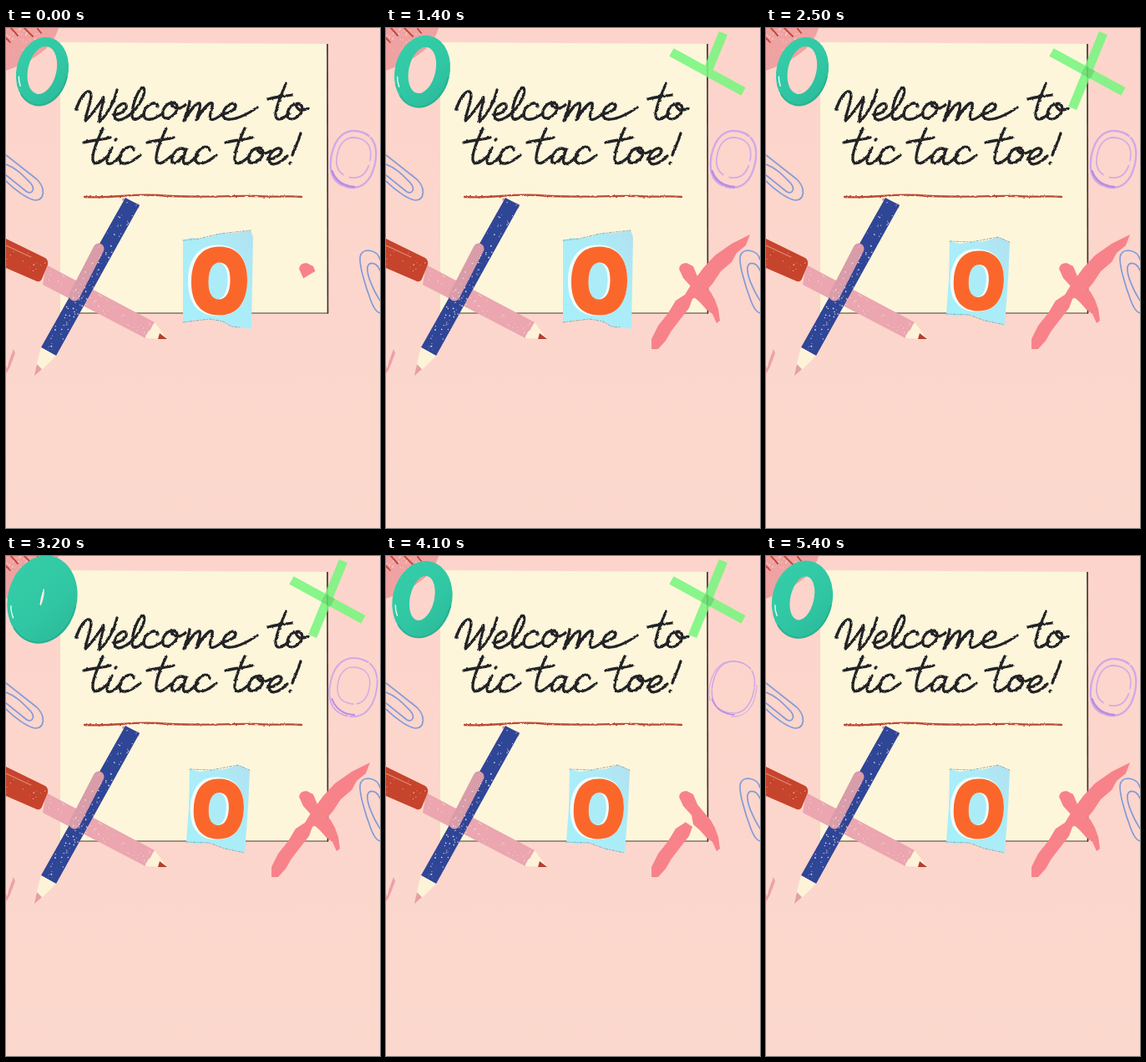
Animation, 448 px wide and 598 px high, one loop 5.5 s. Source, as an HTML page:

```html
<!DOCTYPE html>
<html lang="en">
<head>
<meta charset="utf-8">
<title>Welcome to tic tac toe!</title>
<style>
html, body { margin: 0; width: 100%; height: 100%; overflow: hidden; background: #fcd7cc; }
svg { display: block; width: 100%; height: 100%; }
.line { fill: none; stroke-linecap: round; stroke-linejoin: round; }
</style>
</head>
<body>
<svg viewBox="0 0 448 598" preserveAspectRatio="none">
  <defs>
    <linearGradient id="wall" x2="0" y2="1">
      <stop offset="0" stop-color="#fdd4cb"/><stop offset=".55" stop-color="#fcd6cc"/><stop offset="1" stop-color="#fbd8cd"/>
    </linearGradient>
    <linearGradient id="scrap" x1="1" x2="0" y2="1">
      <stop offset="0" stop-color="#b2e0f0"/><stop offset=".3" stop-color="#adebf7"/><stop offset="1" stop-color="#a6f0fb"/>
    </linearGradient>
    <linearGradient id="balloon" x2="1" y2="1">
      <stop offset="0" stop-color="#36cfaa"/><stop offset=".6" stop-color="#30c6a3"/><stop offset="1" stop-color="#2ab797"/>
    </linearGradient>
    <filter id="rough" filterUnits="userSpaceOnUse" x="70" y="50" width="310" height="170">
      <feTurbulence type="fractalNoise" baseFrequency=".28" numOctaves="2" seed="4"/>
      <feDisplacementMap in="SourceGraphic" scale="2.6" xChannelSelector="R" yChannelSelector="G"/>
    </filter>
    <mask id="maskA" maskUnits="userSpaceOnUse" x="300" y="230" width="148" height="170">
      <path id="wipeA" d="M354 277L402 356" pathLength="1" fill="none" stroke="#fff" stroke-width="46"/>
    </mask>
    <mask id="maskB" maskUnits="userSpaceOnUse" x="300" y="230" width="148" height="170">
      <path id="wipeB" d="M314 392L362 318L440 244" pathLength="1" fill="none" stroke="#fff" stroke-width="56"/>
    </mask>
  </defs>

  <rect width="448" height="598" fill="url(#wall)"/>

  <!-- corner tassel -->
  <path d="M0 0H63C58 16 50 24 40 31C28 40 14 46 0 51Z" fill="#efa2a2"/>
  <path class="line" d="M0 12L5 17M6 0L14 9M22 0L32 10M38 1L42 6" stroke="#c3493c" stroke-width="2"/>
  <g id="cornerDots" fill="#fbd5cf"></g>

  <!-- note -->
  <path d="M65 17L384 19L385 341H65Z" fill="#fdf6db"/>
  <path d="M385 19L385.5 341.5" stroke="#35302d" stroke-width="1.6"/>
  <path d="M65 341H386" stroke="#453e38" stroke-width="1.2"/>

  <g filter="url(#rough)">
    <g class="line" role="img" aria-label="Welcome to tic tac toe!" stroke="#242326" stroke-width="3.3">
      <path d="M84 98C88 84 97 72 101 77C105 82 96 100 95 111C104 103 112 90 117 83C117 92 111 102 112 112C121 104 130 88 133 74"/>
      <path d="M128 104C136 104 146 98 144 92C141 87 130 95 130 104C130 113 140 111 149 103C161 93 168 76 165 72C160 68 151 92 151 104C151 113 159 109 165 103"/>
      <path d="M182 94C181 85 166 92 165 103C165 113 177 110 188 102"/>
      <path d="M201 90C193 88 186 98 188 105C192 113 205 103 205 95C205 89 200 88 198 91C202 98 209 97 215 92"/>
      <path d="M220 88C219 96 215 104 213 111C219 101 228 89 232 90C234 95 229 104 228 110C234 100 243 88 247 90C249 95 242 104 245 109C248 111 254 107 259 103C268 102 276 97 275 92C272 86 260 95 260 104C261 114 281 109 301 95"/>
      <path d="M335 67C330 80 322 96 323 105C324 112 332 109 339 102M314 85C324 82 333 82 343 80"/>
      <path d="M350 91C341 90 335 100 338 107C343 113 355 104 355 96C354 90 349 89 347 92C350 100 356 99 362 96"/>
      <path id="tee" d="M116 120C110 134 103 148 104 158C106 166 114 160 122 153M93 137C104 134 114 134 125 131"/>
      <path d="M127 143C123 151 119 159 122 162C127 164 132 158 138 152M131 134L132 133"/>
      <path id="cee" d="M153 146C151 137 137 145 136 156C136 166 148 163 161 152"/>
      <use href="#tee" x="76"/>
      <path d="M214 145C206 141 197 152 199 160C203 166 213 153 216 145C212 154 211 161 215 163C220 162 225 157 230 152"/>
      <use href="#cee" x="91"/>
      <use href="#tee" x="170"/>
      <path d="M304 144C296 142 289 152 291 159C295 166 308 156 308 149C307 143 303 142 301 145C304 152 311 151 317 147"/>
      <path d="M313 157C321 157 331 151 330 146C327 140 315 148 315 157C316 167 327 163 337 153"/>
      <path d="M353 126C350 136 346 144 343 152M341 161L340 162"/>
    </g>
    <path class="line" d="M94 202C130 204 146 198 182 200C230 204 262 200 300 201C326 203 338 200 354 202" stroke="#bd4a36" stroke-width="2.3"/>
  </g>

  <!-- paper clips -->
  <g class="line" stroke="#829bd8" stroke-width="1.7">
    <path d="M0 152L37 181C48 192 46 206 35 206C26 205 10 193 0 183M0 163C12 167 21 177 29 185C36 193 31 199 25 196L0 176"/>
    <path d="M448 277C445 265 429 263 425 271C421 279 431 310 437 326C440 334 444 340 448 341M448 290C444 280 435 279 433 286C432 295 439 312 448 326"/>
  </g>

  <!-- pencils -->
  <path d="M9 384L11 389L5 405L1 412L3 400ZM0 404L3 409L0 413Z" fill="#e9a3a8"/>
  <path d="M48 283L178 352L167 371L44 307Z" fill="#eba6b0"/>
  <path d="M178 352L193 372L167 371C167 366 170 366 170 363C174 362 174 358 175 357Z" fill="#fdf3d8"/>
  <path d="M184 365L193 372L182 372Z" fill="#b63e2e"/>
  <path d="M0 252L47 275Q51 278 50 283L43 300Q41 304 37 303L0 287Z" fill="#c6432c"/>
  <path class="line" d="M0 260L30 274" stroke="#e08a74" stroke-width="1.2"/>
  <path d="M140 203L160 211L159 216L139 206Z" fill="#d99aa0"/>
  <path d="M143 203L160 212L60 392L42 382Z" fill="#2f4596"/>
  <path class="line" d="M111 264L82 320" stroke="#d99ca9" stroke-width="13"/>
  <path d="M42 382L60 392L43 409L36 405Z" fill="#fdf3d8"/>
  <path d="M37 402L43 408L34 416Z" fill="#e3a0a6"/>
  <g id="specks"></g>

  <path id="paper" fill="url(#scrap)"/>
  <g id="letter"><path id="halo" fill="#f3fdfc" fill-rule="evenodd"/><path id="oh" fill="#fb672b" fill-rule="evenodd"/></g>
  <path id="tear" class="line" stroke="#8aa4ab" stroke-width=".9" stroke-dasharray="3 2 1 2"/>

  <g id="cross" fill="#f8828a">
    <path mask="url(#maskA)" d="M351 288Q352 281 360 281L368 285L373 297L382 308L389 316L394 325L398 336L400 350L396 353L391 342L384 337L376 328L368 321L366 310L356 299Z"/>
    <path mask="url(#maskB)" d="M318 384L318 372L326 356L338 341L347 326L358 319L366 306L380 287L394 272L414 258L436 247L431 260L420 269L414 280L401 291L391 306L380 318L367 324L363 335L352 349L342 362L335 374L326 384Z"/>
  </g>

  <g stroke="#79f67f" stroke-width="11" fill="none" opacity=".88">
    <path id="tapeA" d="M342 29L428 76" pathLength="1"/>
    <path id="tapeB" d="M404 6L367 96" pathLength="1"/>
    <path id="tapeMix" d="M380 50L391 56" stroke="#5fdc6b"/>
  </g>

  <g id="scribble" class="line" stroke="#c8a3ec"></g>

  <g id="ring">
    <path id="ringShape" fill="url(#balloon)" fill-rule="evenodd"/>
    <path id="shade" class="line" stroke="#22a688" stroke-width="2" opacity=".6"/>
    <path id="shine" class="line" stroke="#e8fff6" stroke-width="1.4"/>
  </g>
  <g id="burst">
    <path id="star" fill="#33cba7"/>
    <path id="core" fill="#fff"/>
    <g id="bits"></g>
  </g>
</svg>

<script>
const LOOP = 5500, STEP = 100;
const el = id => document.getElementById(id);
const set = (id, attrs) => { for (const k in attrs) el(id).setAttribute(k, attrs[k]); };
const show = (id, on) => set(id, { visibility: on ? 'visible' : 'hidden' });
const clamp = x => Math.max(0, Math.min(1, x));
const lerp = (a, b, u) => a + (b - a) * u;

function seeded(s) {
  return () => (s = (s * 16807) % 2147483647) / 2147483647;
}

function ellipse(cx, cy, rx, ry) {
  return `M${cx - rx} ${cy}A${rx} ${ry} 0 1 1 ${cx + rx} ${cy}A${rx} ${ry} 0 1 1 ${cx - rx} ${cy}Z`;
}

// squarer than an ellipse, like a bold printed O
function bowl(cx, cy, rx, ry) {
  const k = 0.64, x = rx * k, y = ry * k;
  return `M${cx - rx} ${cy}c0 ${-y} ${rx - x} ${-ry} ${rx} ${-ry}s${rx} ${ry - y} ${rx} ${ry}` +
    `s${x - rx} ${ry} ${-rx} ${ry}s${-rx} ${y - ry} ${-rx} ${-ry}Z`;
}

function spikes(cx, cy, n, rx, ry, dip, turn) {
  const at = (i, k) => {
    const a = turn + i * 2 * Math.PI / n;
    return `${(cx + rx * k * Math.cos(a)).toFixed(1)} ${(cy + ry * k * Math.sin(a)).toFixed(1)}`;
  };
  let d = 'M' + at(0, 1);
  for (let i = 0; i < n; i++) d += `Q${at(i + .5, dip)} ${at(i + 1, i % 2 ? 1 : .92)}`;
  return d + 'Z';
}

function scatter() {
  const rnd = seeded(77);
  let out = '';
  const along = (n, ax, ay, bx, by, half, fill) => {
    const len = Math.hypot(bx - ax, by - ay), nx = -(by - ay) / len, ny = (bx - ax) / len;
    for (let i = 0; i < n; i++) {
      const u = rnd(), v = (rnd() * 2 - 1) * half, r = .35 + rnd() * .55;
      out += `<circle cx="${(lerp(ax, bx, u) + nx * v).toFixed(1)}" cy="${(lerp(ay, by, u) + ny * v).toFixed(1)}" r="${r.toFixed(2)}" fill="${fill}"/>`;
    }
  };
  along(95, 151, 208, 52, 386, 8.5, '#dfe3f2');
  along(50, 48, 295, 170, 360, 9, '#f9d3d2');
  along(14, 0, 270, 44, 290, 13, '#f0a894');
  el('specks').innerHTML = out;
  out = '';
  along(40, 2, 2, 32, 22, 18, '#fbd5cf');
  el('cornerDots').innerHTML = out;
}

const sheets = [
  { d: 'M212 254L222 251L231 252L243 250L256 246L276 245L293 242L296 250L294 360L281 358L270 357L260 351L244 348L228 349L212 352Z',
    tear: 'M212 254L231 252L256 246L293 242M212 352L244 348L260 351L270 357L281 358',
    o: [255.5, 302.5, 33.5, 41, 13, 22], turn: 2 },
  { d: 'M220 255L232 258L246 256L262 255L278 250L292 256L290 300L286 355L273 352L262 350L254 346L243 343L228 345L216 342L219 300Z',
    tear: 'M220 255L246 256L278 250L292 256M216 342L243 343L262 350L286 355',
    o: [254.8, 302.5, 30, 36, 12, 19.5], turn: 4 }
];

function drawLetter(t) {
  const s = sheets[t % 700 < 350 ? 0 : 1], [x, y, rx, ry, hx, hy] = s.o;
  set('paper', { d: s.d });
  set('tear', { d: s.tear });
  set('letter', { transform: `rotate(${s.turn} ${x} ${y})` });
  set('halo', { d: bowl(x - 2, y - .5, rx + 2, ry + 1.5) + bowl(x - 3, y, hx, hy) });
  set('oh', { d: bowl(x, y, rx, ry) + bowl(x, y, hx, hy) });
}

function wipe(id, u) {
  set(id, { 'stroke-dasharray': `${u} 3` });
}

function drawCross(t) {
  const p = t % 3800;
  show('cross', p < 3600);
  wipe('wipeA', clamp(.22 + p * .0038));
  wipe('wipeB', clamp((p - 200) * .0044));
}

function drawTape(t) {
  const a = clamp((t - 820) / 370), b = clamp((t - 1220) / 340), on = t < 5100;
  show('tapeA', on && a > 0);
  show('tapeB', on && b > 0);
  show('tapeMix', on && b > .6);
  wipe('tapeA', a);
  wipe('tapeB', b);
}

// cx, outer radii, inner centre y, inner radii, dash of the inner line, weight
const loops = {
  A: [416, 26.5, 34, 155, 20, 24, '70 6 30 8', 2.4],
  B: [415.5, 27, 35, 154, 20, 24, '46 9 80 5', 2.4],
  C: [416, 28, 35, 155, 19, 22, '90 4', 2],
  D: [416.5, 26.5, 35, 157, 18, 23, '52 7', 1.9],
  E: [416, 25, 31, 159, 28, 33, '54 34', 1.6]
};

function drawScribble(k) {
  const [cx, rx, ry, iy, ix, iry, dash, w] = loops['AAEDCCCBBBDAAE'[k % 14]];
  el('scribble').innerHTML =
    `<g transform="rotate(12 ${cx} 157)">` +
    `<path d="${bowl(cx, 157, rx, ry)}" stroke-width="${w}" stroke-dasharray="62 3 20 2" opacity=".85"/>` +
    `<path d="${bowl(cx, iy, ix, iry)}" stroke-width="${w * .75}" stroke-dasharray="${dash}" opacity=".8"/>` +
    `<path d="M${cx - 22} 176Q${cx - 12} 192 ${cx + 8} 189" stroke-width="${w}" stroke="#b98ce4"/></g>`;
}

// phase, outer radii, hole radii
const puff = [
  [0, 31, 41.5, 17, 29], [350, 35.5, 46.5, 14.5, 27], [400, 36, 47, 14, 26.5],
  [650, 38.5, 50, 8, 18.5], [700, 41.5, 53, 1.5, 9], [950, 42, 53.5, 1.2, 8]
];

function drawRing(p) {
  let i = 0;
  while (i < puff.length - 2 && p >= puff[i + 1][0]) i++;
  const a = puff[i], b = puff[i + 1], u = clamp((p - a[0]) / (b[0] - a[0]));
  const [rx, ry, hx, hy] = [1, 2, 3, 4].map(j => lerp(a[j], b[j], u));
  const x = 43.5, y = 52;
  set('ring', { transform: `rotate(13 ${x} ${y})` });
  set('ringShape', { d: ellipse(x, y, rx, ry) + ellipse(x - .5, y - 1.5, hx, hy) });
  set('shade', { d: `M${x + rx - 1} ${y}A${rx - 1} ${ry - 1} 0 0 1 ${x - rx * .6} ${y + ry * .78}` });
  set('shine', { d: `M${x - rx * .84} ${y + ry * .3}q1 ${ry * .12} ${rx * .14} ${ry * .25}` +
    (hx < 4 ? `M${x - 1} ${y - 3 - hy}v${hy * 2}` : '') });
}

function drawBurst(p) {
  const g = (p - 1050) / 100, r = 1 + g * .1;
  show('star', p < 1150);
  show('core', p < 1150);
  set('star', { d: spikes(41, 54, 10, 55 * r, 57 * r, .6, -.05) });
  set('core', { d: spikes(40, 54, 6, 18 * (1 + g * .5), 20 * (1 + g * .5), .48, .25) });
  const rnd = seeded(4242), tones = ['#2fb99b', '#f0a028', '#d84a3c'];
  let out = '';
  for (let i = 0; i < 34; i++) {
    const a = (i + rnd() * .7) * Math.PI / 17, d = (54 + rnd() * 24) * (1 + g * .13);
    const x = 42 + d * Math.cos(a), y = 55 + d * Math.sin(a), tone = tones[i % 3];
    const dot = tone === tones[1], len = dot ? 3.6 : 3 + rnd() * 6, w = dot ? 3.4 : 1.4;
    out += `<rect x="${-len / 2}" y="${-w / 2}" width="${len}" height="${w}" fill="${tone}" ` +
      `transform="translate(${x.toFixed(1)} ${y.toFixed(1)}) rotate(${(a * 180 / Math.PI).toFixed(0)})"/>`;
  }
  el('bits').innerHTML = out;
}

function drawBalloon(t) {
  const p = t % 1250, popped = p >= 970;
  el('ring').style.display = popped ? 'none' : '';
  el('burst').style.display = popped ? '' : 'none';
  (popped ? drawBurst : drawRing)(p);
}

function draw(t) {
  drawLetter(t);
  drawCross(t);
  drawTape(t);
  drawScribble(t / STEP);
  drawBalloon(t);
}

scatter();
let start = null, last = -1;
function tick(now) {
  if (start === null) start = now;
  const k = Math.floor(((now - start) % LOOP) / STEP);
  if (k !== last) draw((last = k) * STEP);
  requestAnimationFrame(tick);
}
draw(0);
requestAnimationFrame(tick);
</script>
</body>
</html>
```
